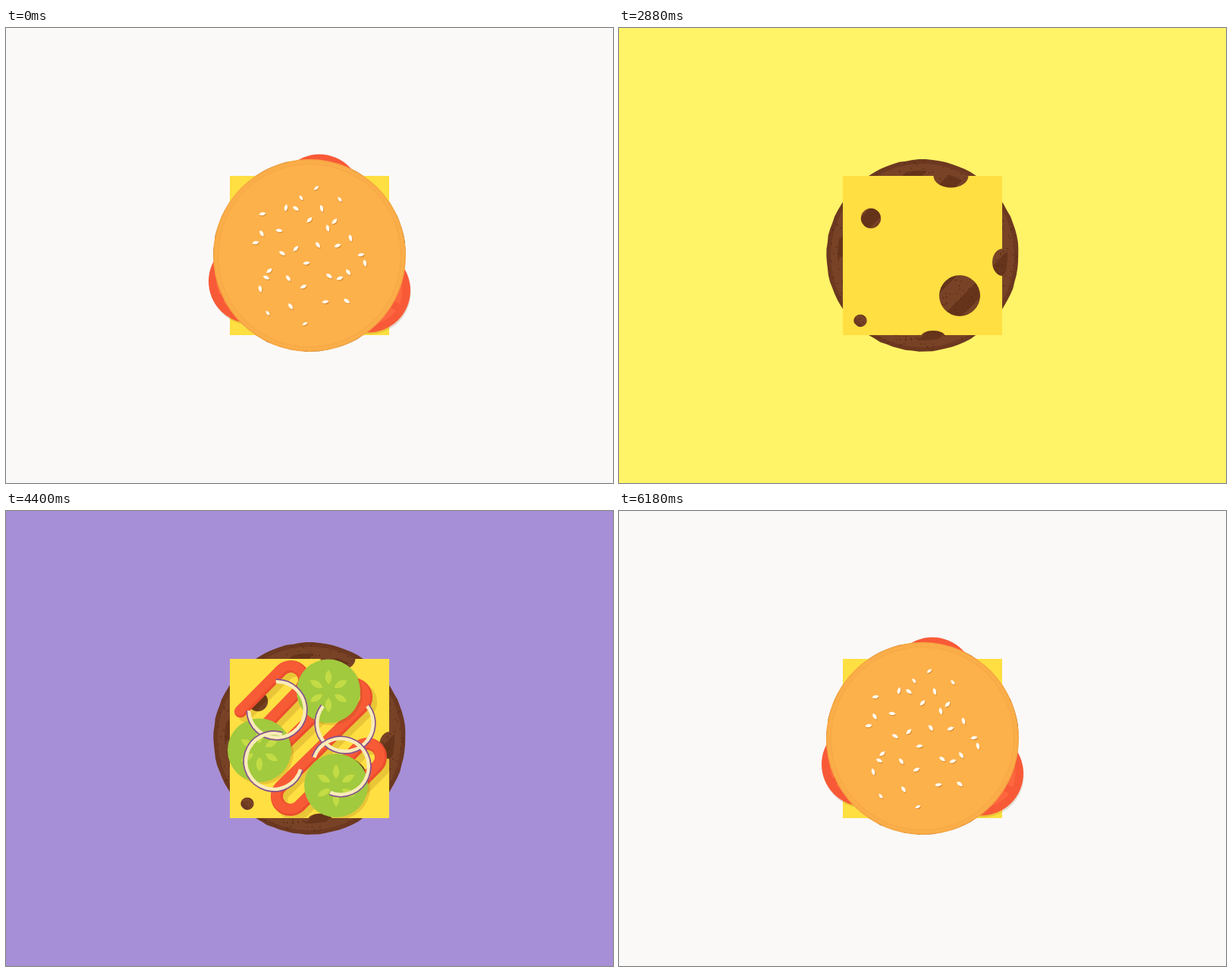
These frames come from a looping animation (800x600 px, 7180 ms). An HTML page:

```html
<!DOCTYPE html>
<html lang="en">
<head>
<meta charset="utf-8">
<title>Burger</title>
<style>
  html, body { margin: 0; width: 100%; height: 100%; overflow: hidden; background: #faf9f8; }
  svg { display: block; width: 100vw; height: 100vh; }
</style>
</head>
<body>
<svg id="stage" viewBox="0 0 800 600"></svg>
<script>
const LOOP = 7180, CLEAR = 500, FIRST = 1240, STEP = 610, FALL = 60, POUR = 400;
const PAPER = '#faf9f8';
const SHADOW = 'rgba(110,70,0,.16)';

const circle = (x, y, r, fill, extra = '') =>
  `<circle cx="${x}" cy="${y}" r="${r}" fill="${fill}" ${extra}/>`;
const ellipse = (x, y, rx, ry, fill) =>
  `<ellipse cx="${x}" cy="${y}" rx="${rx}" ry="${ry}" fill="${fill}"/>`;
const times = (n, fn) => Array.from({ length: n }, (_, i) => fn(i)).join('');

function random(seed) {
  return () => (seed = (seed * 16807) % 2147483647) / 2147483647;
}

function bottomBun() {
  return circle(400, 300, 126, '#fdb048') + circle(400, 300, 116.5, '#ffbe74');
}

function patty() {
  const rnd = random(77);
  const edge = Array.from({ length: 90 }, (_, i) => {
    const a = i * Math.PI / 45, r = 126.2 + rnd() * 0.9;
    return `${(400 + r * Math.cos(a)).toFixed(1)},${(300 + r * Math.sin(a)).toFixed(1)}`;
  }).join(' ');
  const grill = times(5, i =>
    `<rect x="265" y="${207 + i * 42}" width="270" height="18" fill="#65341a"/>`);
  const specks = times(620, () => {
    const a = rnd() * 6.283, r = 124 * Math.sqrt(rnd());
    return circle((400 + r * Math.cos(a)).toFixed(1), (300 + r * Math.sin(a)).toFixed(1), 0.8, '#522810');
  });
  return `<polygon points="${edge}" fill="#6c3820"/>` + circle(400, 300, 121, '#784226') +
    `<g clip-path="url(#grillArea)"><g transform="rotate(-45 400 300)">${grill}</g></g>` + specks;
}

function cheese() {
  const holes = ellipse(437.5, 195, 23, 15.5, '#000') + circle(332, 251, 13.2, '#000') +
    ellipse(506, 309, 14, 18, '#000') + circle(449, 353, 27, '#000') +
    ellipse(318, 386, 8.7, 8.2, '#000') + ellipse(414, 407, 16, 8, '#000');
  return `<mask id="holes" maskUnits="userSpaceOnUse" x="295" y="195" width="210" height="210">
    <rect x="295" y="195" width="210" height="210" fill="#fff"/>${holes}</mask>
    <rect x="295" y="195" width="210" height="210" fill="#ffdf42" mask="url(#holes)"/>`;
}

// Parallel diagonal strokes joined by half-circle turns around these centres.
function ketchup() {
  const turns = [[376, 222], [344, 306], [458, 245], [374, 377], [477, 324]];
  const d = 'M309 264.5' + turns.map(([x, y], i) =>
    `L${x - 12.5} ${y - 12.5}A17.7 17.7 0 0 ${1 - i % 2} ${x + 12.5} ${y + 12.5}`).join('') + 'L455 371';
  const line = (color, width, shift) =>
    `<path class="pour" pathLength="100" d="${d}" fill="none" stroke="${color}" stroke-width="${width}"
      stroke-linecap="round" stroke-linejoin="round" stroke-dasharray="100 200"
      transform="translate(${shift} ${shift})"/>`;
  return `<g clip-path="url(#cheeseArea)">${line(SHADOW, 16, 6)}</g>` +
    line('#ec4d2e', 16, 0) + line('#f75b36', 12.5, -1.2);
}

function pickle([x, y]) {
  const petals = times(6, i =>
    `<path d="M0 -9Q8.5 -18 0 -28Q-8.5 -18 0 -9" fill="#c3dc45" transform="rotate(${i * 60})"/>`);
  return circle(x + 3, y + 3, 42, SHADOW) + circle(x, y, 42, '#a1ca3e') +
    `<g transform="translate(${x} ${y})">${petals}</g>`;
}

function onion([x, y, from, to]) {
  const arc = (r, color, width) => {
    const at = deg => {
      const a = deg * Math.PI / 180;
      return `${x + r * Math.cos(a)} ${y + r * Math.sin(a)}`;
    };
    return `<path d="M${at(from)}A${r} ${r} 0 1 1 ${at(to)}" fill="none" stroke="${color}" stroke-width="${width}"/>`;
  };
  return arc(39.5, '#85508f', 2.4) + arc(36.8, '#f9ecb8', 4.4);
}

function tomato([x, y]) {
  const spokes = times(3, i =>
    `<rect x="-5" y="-48" width="10" height="96" fill="#f85a37" transform="rotate(${i * 60})"/>`);
  const seeds = times(6, i =>
    `<path d="M0 -29Q4.5 -35 0 -39Q-4.5 -35 0 -29" fill="#ff8652" transform="rotate(${30 + i * 60})"/>`);
  return circle(x + 1, y + 3, 55, SHADOW) + circle(x, y, 55.5, '#f85a37') +
    circle(x, y, 45, '#fd683f') + circle(x, y, 27, '#ff7546') +
    `<g transform="translate(${x} ${y})">${spokes}${seeds}</g>`;
}

function topBun() {
  const seeds = [
    [409, 211, -40], [389, 224, 55], [440, 226, 50], [369, 237, -80], [382, 238, 35], [416, 238, 75],
    [338, 245, -10], [400, 253, -45], [433, 255, -45], [424, 264, 75], [360, 267, 5], [337, 271, 60],
    [454, 277, 75], [329, 283, -10], [411, 286, 55], [437, 287, -20], [382, 291, -45], [364, 297, 30],
    [468, 299, -8], [473, 310, 75], [396, 310, -8], [347, 320, -40], [451, 322, 55], [426, 327, 35],
    [343, 329, 25], [372, 330, 55], [440, 330, -20], [335, 344, 75], [392, 341, -25], [421, 361, -8],
    [449, 360, 35], [375, 367, 55], [345, 376, 50], [394, 390, -25]
  ];
  const seed = ([x, y, turn]) => {
    const size = Math.abs(y - 300) > 70 ? 0.82 : 1;
    const shape = (dx, dy, color) =>
      `<path d="M-4.8 0Q0 -4.6 4.8 0Q0 4.6 -4.8 0" fill="${color}"
        transform="translate(${x + dx} ${y + dy}) rotate(${turn}) scale(${size})"/>`;
    return shape(0.8, 1.2, '#d98d30') + shape(0, 0, '#fffaf0');
  };
  return circle(400, 300, 127, '#f6a843') + circle(400, 300, 125, '#fbae49') +
    circle(400, 300, 121, 'none', 'stroke="#e59c3c" stroke-width="1" stroke-dasharray="1 2"') +
    circle(400, 300, 119, '#fdb14b') + seeds.map(seed).join('');
}

const layers = [
  { bg: PAPER, art: bottomBun() },
  { bg: '#c58d78', art: patty() },
  { bg: '#fff468', art: cheese() },
  { bg: '#ff6b57', art: ketchup(), pours: true },
  { bg: '#c1d65c', art: [[425, 237.5], [334, 315.5], [435, 362]].map(pickle).join('') },
  { bg: '#a68fd6', art: [[357, 262, -92, 178], [447, 280, -38, 218], [353, 330, 17, -73], [441, 337, 199, 112]].map(onion).join('') },
  { bg: '#ff843f', art: [[413, 222], [322.5, 334], [477.5, 346]].map(tomato).join('') },
  { bg: PAPER, art: topBun() }
];

const stage = document.getElementById('stage');
stage.innerHTML = `<defs>
    <clipPath id="grillArea"><circle cx="400" cy="300" r="112"/></clipPath>
    <clipPath id="cheeseArea"><rect x="295" y="195" width="210" height="210"/></clipPath>
  </defs>
  <rect id="backdrop" width="800" height="600"/>` +
  layers.map(layer => `<g class="layer">${layer.art}</g>`).join('');

const backdrop = document.getElementById('backdrop');
const groups = [...stage.querySelectorAll('.layer')];
const pours = [...stage.querySelectorAll('.pour')];
const clamp = v => Math.max(0, Math.min(1, v));

function render(t) {
  const whole = t < CLEAR;
  let bg = PAPER;
  layers.forEach((layer, i) => {
    const age = whole ? LOOP : t - FIRST - i * STEP;
    groups[i].style.display = age >= 0 ? '' : 'none';
    if (age < 0) return;
    if (age >= FALL) bg = layer.bg;
    if (layer.pours) {
      const left = 1 - clamp(age / POUR);
      pours.forEach(p => p.setAttribute('stroke-dashoffset', 100 * left));
    } else {
      const scale = 1 + 2 * (1 - clamp(age / FALL) ** 2);
      groups[i].setAttribute('transform',
        `translate(400 300) scale(${scale}) translate(-400 -300)`);
    }
  });
  backdrop.setAttribute('fill', bg);
}

const begin = performance.now();
function tick() {
  render((performance.now() - begin) % LOOP);
  requestAnimationFrame(tick);
}
tick();
</script>
</body>
</html>
```
